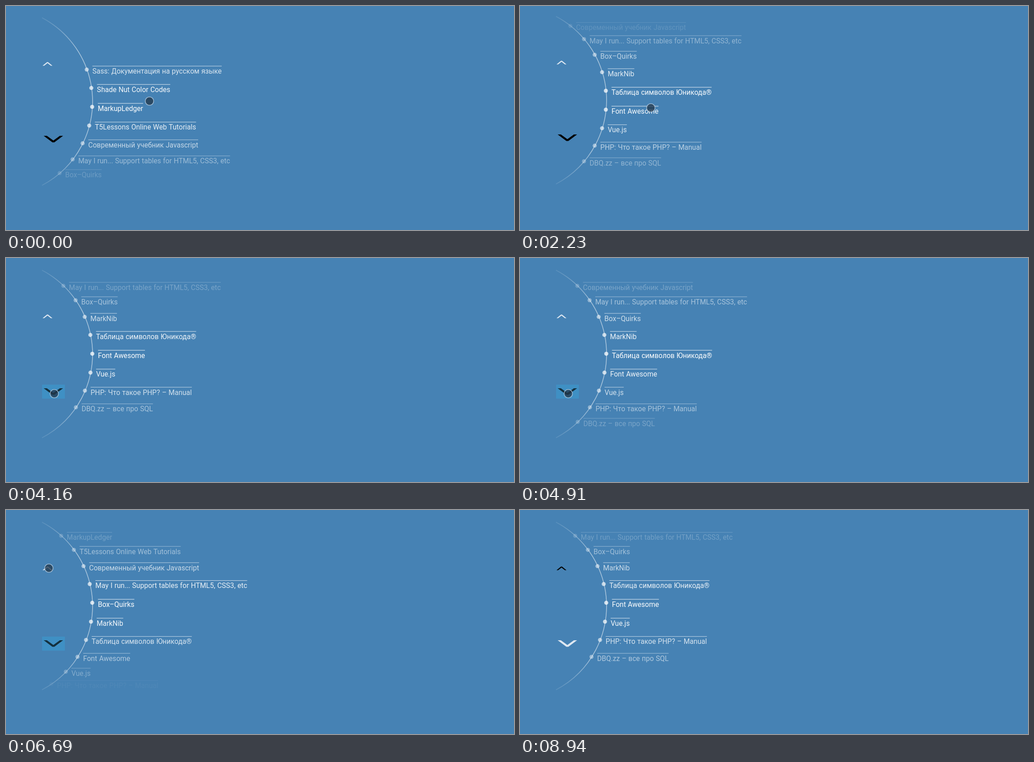
Recreate the animation shown at these times as an HTML page with a canvas. Size 1126 by 497 pixels, loop 9.19 s.

```html
<!DOCTYPE html>
<html lang="ru">
<head>
<meta charset="utf-8">
<title>Wheel menu</title>
<style>
html, body { margin: 0; width: 100%; height: 100%; overflow: hidden; background: #4682b4; }
canvas { display: block; }
</style>
</head>
<body>
<canvas id="stage" width="1126" height="497"></canvas>
<script>
const ctx = document.getElementById('stage').getContext('2d');
const LOOP = 9190, TICK = 149, LAST = 60;
const CX = -18.4, CY = 213, R = 210.3, STEP = 0.2;
const PALE = [222, 232, 242], BLACK = [0, 0, 0], PRESSED = [20, 48, 62];

const items = [
  'Sass: Документация на русском языке',
  'Shade Nut Color Codes',
  'MarkupLedger',
  'T5Lessons Online Web Tutorials',
  'Современный учебник Javascript',
  'May I run... Support tables for HTML5, CSS3, etc',
  'Box–Quirks',
  'MarkNib',
  'Таблица символов Юникода®',
  'Font Awesome',
  'Vue.js',
  'PHP: Что такое PHP? – Manual',
  'DBQ.zz – все про SQL'
];

// Ticks at which the arrow buttons are pressed
const downPresses = [27, 32, 36], upPresses = [45, 49, 53];

// Pointer moves: first tick, last tick, dx, dy
const glides = [[0, 6, -42, 37], [6, 15, 14, -22], [21, 25, -183, 75],
  [36, 38, 18, -86], [38, 42, -30, -86], [57, 59, 994, 358]];

const clamp = v => Math.max(0, Math.min(1, v));
const white = a => `rgba(255,255,255,${a})`;
const blend = (a, b, f) => `rgb(${a.map((v, i) => Math.round(v + (b[i] - v) * f))})`;

function ease(k, from, to) {
  const u = clamp((k - from) / (to - from));
  return u * u * (3 - 2 * u);
}

// Index of the item in the middle: a drag, a settling, then single steps
function wheel(k) {
  const steps = presses => presses.reduce((sum, t) => sum + ease(k, t, t + 4), 0);
  const drag = 6.78 * clamp(k / 15) ** 1.4;
  return 1.72 + drag + 0.67 * ease(k, 15, 25) - steps(downPresses) + steps(upPresses);
}

// The page is pulled up slightly while it is dragged
function lift(k) {
  return -4 * Math.abs((Math.min(k, 15) - 6) / 9) ** 3.4 * (1 - ease(k, 15, 19));
}

function disc(x, y, r, fill) {
  ctx.beginPath();
  ctx.arc(x, y, r, 0, 7);
  ctx.fillStyle = fill;
  ctx.fill();
}

function chevron(x, y, w, h, fill) {
  const half = [[1, 0], [0.1, 1], [-0.1, 1], [-1, 0], [-0.67, 0], [0, 0.73], [0.67, 0]];
  ctx.beginPath();
  half.forEach(([u, v]) => ctx.lineTo(x + u * w, y + v * h));
  ctx.fillStyle = fill;
  ctx.fill();
}

function box(y, alpha) {
  ctx.fillStyle = `rgba(63,144,196,${alpha})`;
  ctx.fillRect(80, y, 50.5, 31);
}

function drawArc() {
  const fade = ctx.createLinearGradient(0, 26, 0, 400);
  [0.1, 0.55, 0.55, 0.55, 0.55, 0.1].forEach((a, i) => fade.addColorStop(i / 5, white(a)));
  const end = Math.asin(186 / R);
  ctx.beginPath();
  ctx.arc(CX, CY, R, -end, end);
  ctx.strokeStyle = fade;
  ctx.lineWidth = 1.6;
  ctx.stroke();
}

function drawItem(text, d) {
  const alpha = 1 - (Math.abs(d) / 5) ** 1.5;
  if (alpha <= 0) return;
  const x = CX + R * Math.cos(d * STEP) - 0.6;
  const y = CY + R * Math.sin(d * STEP);
  disc(x, y, 4.5, white(0.76 * alpha));
  ctx.fillStyle = white(0.75 * alpha);
  ctx.fillRect(x + 12.5, y - 8.3, ctx.measureText(text).width, 1.2);
  ctx.fillStyle = white(alpha);
  ctx.fillText(text, x + 12.5, y + 9.2);
}

function drawArrows(k) {
  const swap = ease(k, 49, 51);
  const held = k >= 23 && k < 46;
  const hover = ease(k, 49, 53) - ease(k, 56, 58);
  if (held) box(281, 1);
  box(121.5, hover);
  chevron(92, 133.5, 11, -8, blend(PALE, blend(BLACK, PRESSED, hover).match(/\d+/g).map(Number), swap));
  chevron(105, 289, 21.5, 14.5, blend(held ? PRESSED : BLACK, PALE, swap));
}

function drawPointer(k) {
  if (k >= LAST) return;
  let x = 318, y = 211;
  for (const [from, to, dx, dy] of glides) {
    const u = ease(k, from, to);
    x += dx * u;
    y += dy * u;
  }
  disc(x, y, 9.3, 'rgba(33,54,74,.75)');
  ctx.strokeStyle = 'rgba(190,212,232,.75)';
  ctx.lineWidth = 1.6;
  ctx.stroke();
}

function draw(now) {
  const k = Math.min(LAST, Math.floor((now % LOOP + 20) / TICK));
  const pos = wheel(k);
  ctx.fillStyle = '#4682b4';
  ctx.fillRect(0, 0, 1126, 497);
  ctx.font = '15.6px Roboto, sans-serif';
  ctx.wordSpacing = '0.5px';
  ctx.save();
  ctx.translate(0, lift(k));
  drawArc();
  items.forEach((text, i) => drawItem(text, i - pos));
  drawArrows(k);
  ctx.restore();
  drawPointer(k);
}

const start = performance.now();
function tick() {
  draw(performance.now() - start);
  requestAnimationFrame(tick);
}
tick();
</script>
</body>
</html>
```
